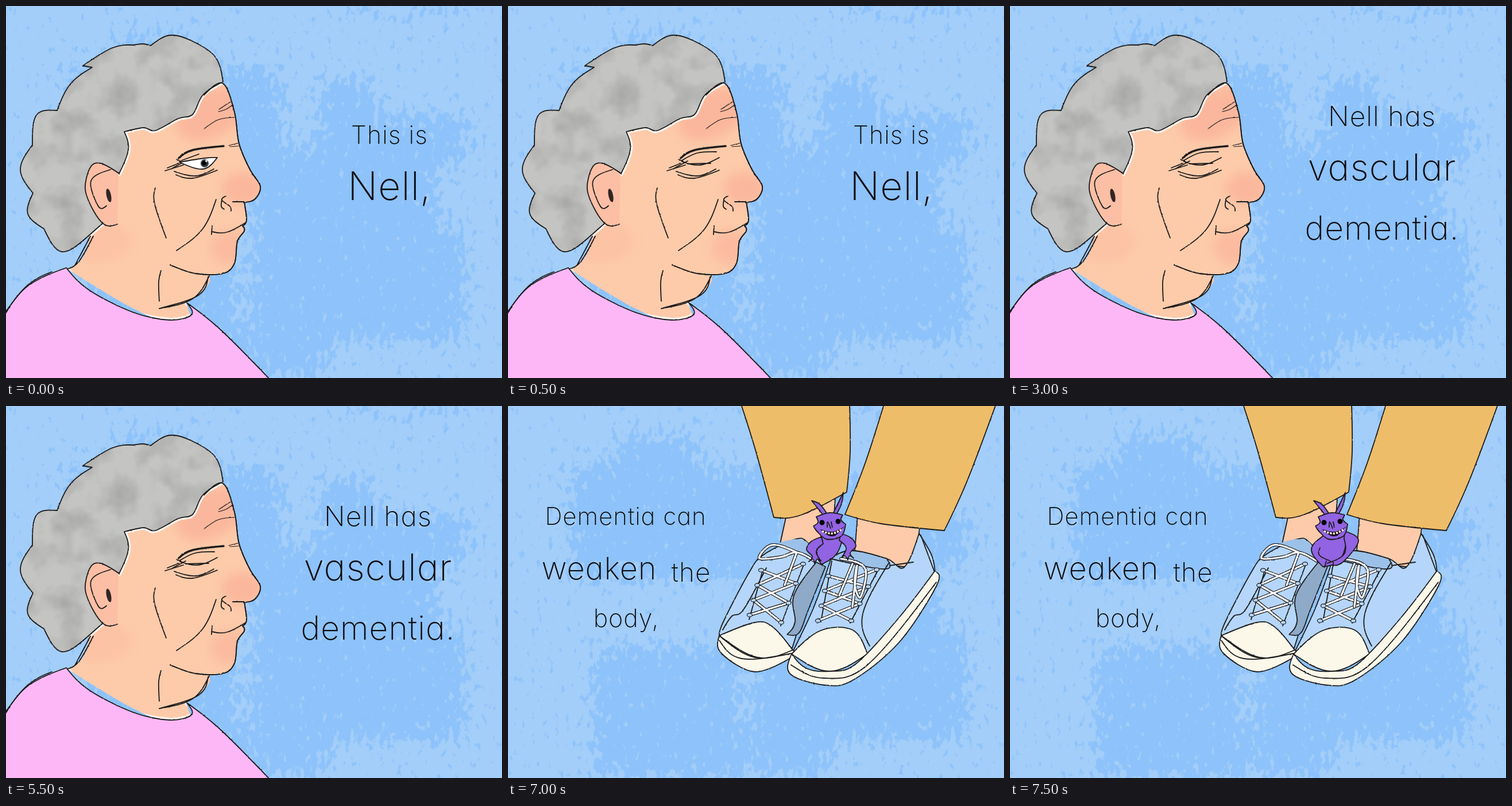
An HTML page that plays this animation: 864 by 648 pixels, repeating every 8000 ms.

```html
<!DOCTYPE html>
<html lang="en">
<head>
<meta charset="utf-8">
<title>Living with dementia</title>
<style>
  html, body { margin: 0; width: 100%; height: 100%; overflow: hidden; background: #a3cef9; }
  svg { display: block; width: 100vw; height: 100vh; }
  path { stroke-linecap: round; stroke-linejoin: round; }
  .ink { fill: none; stroke: #1c1a1b; stroke-width: 1.8; }
  .bold { stroke-width: 3.6; }
  .fine { stroke-width: 1.2; }
  .skin { fill: #fdcbaa; }
  .ear { fill: #fcbfa5; }
  .hair { fill: #c4c4c2; }
  .shirt { fill: #fdb7f6; }
  .cloth { fill: #eebd6a; }
  .cream { fill: #fbf8ea; }
  .denim { fill: #b5d6fa; }
  .lining { fill: #9bc1e9; }
  .shade { fill: #8eaac8; }
  .purple { fill: #9264e2; }
  .white { fill: #fff; }
  .blush { fill: #f9a48f; }
  .halo { fill: none; stroke: #fff7f0; stroke-width: 8; }
  .edge { fill: none; stroke: #1c1a1b; stroke-width: 5.6; }
  .lace { fill: none; stroke: #fff; stroke-width: 3.2; }
  .teeth { fill: none; stroke: #fff3da; stroke-width: 3.4; stroke-dasharray: 3.4 2; stroke-linecap: butt; }
  text { font-family: Inter, Lato, sans-serif; font-weight: 200; font-feature-settings: "cv11"; letter-spacing: 1px; text-anchor: middle; fill: #0c0d10; }
</style>
</head>
<body>
<svg viewBox="0 0 864 648">
  <defs>
    <filter id="grunge" filterUnits="userSpaceOnUse" x="0" y="0" width="864" height="648" color-interpolation-filters="sRGB">
      <feGaussianBlur in="SourceAlpha" stdDeviation="20" result="soft"/>
      <feTurbulence type="fractalNoise" baseFrequency=".1 .06" numOctaves="5" seed="8"/>
      <feColorMatrix values="0 0 0 0 0  0 0 0 0 0  0 0 0 0 0  1 0 0 0 0"/>
      <feComposite in2="soft" operator="arithmetic" k2="1.3" k3=".6" k4="-.45"/>
      <feComponentTransfer result="patch"><feFuncA type="linear" slope="7" intercept="-3"/></feComponentTransfer>
      <feFlood flood-color="#8dc2fa"/>
      <feComposite in2="patch" operator="in"/>
    </filter>
    <filter id="wash" color-interpolation-filters="sRGB">
      <feTurbulence type="fractalNoise" baseFrequency=".022" numOctaves="3" seed="4"/>
      <feColorMatrix values="0 0 0 0 .4  0 0 0 0 .4  0 0 0 0 .4  .6 0 0 0 -.24"/>
      <feComposite in2="SourceAlpha" operator="in" result="tint"/>
      <feMerge><feMergeNode in="SourceGraphic"/><feMergeNode in="tint"/></feMerge>
    </filter>
    <filter id="pencil" filterUnits="userSpaceOnUse" x="0" y="0" width="864" height="648">
      <feTurbulence type="fractalNoise" baseFrequency=".25" numOctaves="2"/>
      <feDisplacementMap in="SourceGraphic" scale="2" xChannelSelector="R" yChannelSelector="G"/>
    </filter>
    <filter id="blur" x="-60%" y="-60%" width="220%" height="220%"><feGaussianBlur stdDeviation="9"/></filter>

    <path id="head" data-p="200,205* 345,150* 390,300 378,440 354,469* 350,488 314,519* 323,542* 250,540 107,458* 140,425 150,330z"/>
    <path id="profile" data-p="345,155* 378,135 398,185 406,240 425,285 443,314 434,336 415,342* 419,373 412,383* 415,392 403,410 398,448 378,466 330,466 286,451*"/>
    <path id="hair" data-p="378,132* 364,88 322,60 285,51 252,69* 238,66 222,68* 185,73 134,104* 150,107* 112,136 89,182* 53,190 46,242* 25,285 47,326* 38,362 66,388* 97,428 143,401* 169,378* 165,300 197,292* 213,250 206,219* 240,212 260,217 300,196 325,189 343,155 378,132*z"/>
    <path id="shirt" data-p="105,456* 145,495 220,533 285,547 323,538 315,517* 375,565 464,655* -9,655* -9,550* 35,490 105,456*z"/>
    <clipPath id="skinClip"><use href="#head"/><use href="#profile"/></clipPath>

    <path id="laces"/>
    <path id="bows" data-p="503,255 460,242 438,265 475,263 503,255 534,270 / 503,255 482,312 / 580,266 622,283 614,333 604,312 607,280 / 600,275 577,330 / 608,278 600,350"/>
    <path id="arm" class="ink purple" data-p="546,228* 528,236 520,250 530,262 524,271* 531,267 534,274* 539,267 545,270* 537,253 549,240*z"/>
  </defs>

  <rect width="864" height="648" fill="#a3cef9"/>
  <path filter="url(#grunge)" d="M545 130H640V190H805V270H750V390H800V580H560V640H430V250H545ZM110 100H190V50H330V110H480V300H110ZM150 420H400V560H420V648H150ZM590 0H800V16H590Z"/>

  <g id="portrait">
    <g filter="url(#pencil)">
      <use href="#head" class="skin"/>
      <use href="#profile" class="ink skin"/>
    </g>
    <g clip-path="url(#skinClip)">
      <g class="blush" filter="url(#blur)">
        <ellipse cx="358" cy="188" rx="66" ry="40" opacity=".5" transform="rotate(-28 358 188)"/>
        <ellipse cx="412" cy="318" rx="36" ry="28" opacity=".5"/>
        <ellipse cx="388" cy="420" rx="32" ry="30" opacity=".4"/>
        <ellipse cx="162" cy="410" rx="55" ry="36" opacity=".2"/>
      </g>
      <use href="#hair" class="halo"/>
      <use href="#shirt" class="halo"/>
    </g>
    <use href="#hair" class="hair" filter="url(#wash)"/>
    <g filter="url(#pencil)">
      <use href="#hair" class="ink"/>
      <use href="#shirt" class="ink shirt"/>
      <use href="#profile" class="ink"/>
      <path class="ink ear" data-p="196,291* 165,274 147,281 138,318 151,354 172,381 194,380*"/>
      <path class="ink" data-p="182,285 148,305 161,349 175,348 / 415,341 395,341 / 152,401 127,445 107,458 / 147,401 120,452 / 354,470 325,510 267,527 / 352,472 335,504 270,526 / -3,536 38,486 80,463"/>
      <path class="ink" data-p="260,317 259,345 279,404 / 366,337 342,389 297,426 / 359,383 358,398 / 358,393 385,394 418,377 / 383,331 376,338 390,349 392,357 / 376,338 375,349 380,354 / 270,461 266,480 267,514"/>
      <path class="ink fine" data-p="370,184 383,180 395,172 / 371,180 391,167 / 345,214 370,198 398,194 / 388,243 404,239 / 390,245 405,244"/>
      <path class="ink bold" data-p="301,265 325,251 379,244"/>
      <path class="ink" data-p="277,287 309,277 / 281,282 301,274 / 297,267 309,273 / 289,283 313,270 / 293,288 330,296 362,284 / 296,294 325,300 368,286"/>
      <ellipse cx="179" cy="330" rx="4" ry="12" transform="rotate(-12 179 330)" fill="#302523"/>
    </g>
    <g id="eyeOpen">
      <path class="ink white" data-p="302,272* 346,265 368,264* 343,284 302,272*z"/>
      <circle cx="346" cy="274" r="7" fill="#343c42"/>
      <circle cx="345" cy="274" r="3.8"/>
      <circle cx="349" cy="270" r="1.8" class="white"/>
      <path class="ink" data-p="306,269 336,258"/>
    </g>
    <path id="eyeShut" class="ink" data-p="303,269 330,256 363,254 / 303,271 335,277 368,264 / 313,275 353,274"/>
    <g id="intro">
      <text x="668" y="240" font-size="43">This is</text>
      <text x="668" y="338" font-size="68">Nell,</text>
    </g>
    <g id="diagnosis">
      <text x="648" y="209" font-size="48">Nell has</text>
      <text x="648" y="304" font-size="64">vascular</text>
      <text x="648" y="407" font-size="57">dementia.</text>
    </g>
  </g>

  <g id="shoes">
    <g filter="url(#pencil)">
      <path class="ink skin" data-p="486,185* 473,245* 565,240* 570,160*z"/>
      <path class="ink skin" data-p="609,190* 604,253* 680,279 706,268 717,212*z"/>
      <path class="ink cloth" data-p="406,-3* 432,80 463,194* 510,190 590,150* 596,80 595,-3*"/>
      <path class="ink cloth" data-p="655,-3* 622,100 587,189* 650,205 760,217* 800,130 850,-3*"/>
      <path class="ink denim" data-p="368,400* 376,374 420,290 444,260 500,232 522,238 548,276* 520,345 494,425*z"/>
      <path class="lining" data-p="470,239* 500,232 522,238 533,264* 490,252z"/>
      <path class="ink shade" data-p="537,272* 498,330 500,376 486,398* 507,395 522,358 553,280*z"/>
      <path class="ink denim" data-p="494,432* 532,352 562,268* 598,252 660,266 690,281 716,222* 738,260 744,290* 680,373 626,432*z"/>
      <path class="ink lining" data-p="562,266* 598,252 660,266* 655,284 562,266*z"/>
      <path class="ink" data-p="444,285 420,372 / 516,274 475,383 / 450,282 410,355 390,366 374,390 / 564,270 545,376 / 645,285 596,378 / 663,274 618,362 630,418 / 665,278 706,272 / 719,225 744,292"/>
      <path class="ink cream" data-p="368,400* 372,431 430,463 494,438 496,425* 430,438 368,400*z"/>
      <path class="ink cream" data-p="368,400* 430,377 460,384 496,425* 435,438 368,400*z"/>
      <path class="ink cream" data-p="494,432* 545,391 600,390 626,432* 560,462 494,432*z"/>
      <path class="ink cream" data-p="743,288* 746,314 681,412 600,478 550,486 492,467 494,432* 520,457 560,462 605,450 680,370 743,288*z"/>
      <path class="ink" data-p="368,408 407,440 494,431 / 493,451 550,474 625,452 746,307"/>
      <use href="#laces" class="edge"/><use href="#laces" class="lace"/>
      <use href="#bows" class="edge"/><use href="#bows" class="lace"/>
      <g id="eyelets"></g>
    </g>
    <g id="armsApart" filter="url(#pencil)">
      <path class="ink purple" data-p="546,226* 538,256 546,276* 572,258 584,226*z"/>
      <use href="#arm"/>
      <use href="#arm" transform="translate(1126 -6) scale(-1 1)"/>
    </g>
    <g id="armsJoined" filter="url(#pencil)">
      <path class="ink purple" data-p="546,226* 525,250 545,280* 575,268 588,226*z"/>
      <path class="ink purple" data-p="583,218* 607,235 582,270 563,278* 562,271 553,274* 582,258 582,231*z"/>
      <path class="ink" data-p="540,247 539,260 558,270 / 548,281 551,270"/>
    </g>
    <g filter="url(#pencil)">
      <path class="ink purple" data-p="549,190* 529,165* 543,171 556,188*z"/>
      <path class="ink purple" data-p="566,188* 584,151* 581,170 573,187*z"/>
      <path class="ink purple" data-p="537,193* 560,186 583,190* 580,198 588,206* 580,227 555,232 538,218 532,209* 540,203 537,193*z"/>
      <path fill="#1b1020" data-p="543,214* 565,219 586,210* 565,227 543,214*z"/>
      <path class="teeth" data-p="547,218 565,222 583,214"/>
      <path class="ink" data-p="556,211 557,202 562,213 / 565,211 563,202"/>
      <circle cx="547" cy="203" r="4.5"/><circle cx="575" cy="201" r="4.5"/>
    </g>
    <text x="205" y="207" font-size="42">Dementia can</text>
    <text x="159" y="302" font-size="54">weaken</text>
    <text x="319" y="306" font-size="46">the</text>
    <text x="206" y="385" font-size="43">body,</text>
  </g>
</svg>
<script>
  const $ = id => document.getElementById(id);
  const mix = (a, b, t) => a.map((v, k) => v + (b[k] - v) * t);

  // Smooth stroke through "x,y" points; "*" marks a sharp corner, "z" closes.
  function curve(text) {
    const pts = text.replace('z', '').split(' ').map(s => s.split(',').map(parseFloat));
    const sharp = text.split(' ').map((s, i) => s.includes('*') || i === 0 || i === pts.length - 1);
    const handle = (i, side) => pts[i].map((v, k) => v + side * (pts[i + 1][k] - pts[i - 1][k]) / 6);
    let d = 'M' + pts[0];
    for (let i = 1; i < pts.length; i++) {
      const a = pts[i - 1], b = pts[i];
      let out = sharp[i - 1] ? a : handle(i - 1, 1);
      let back = sharp[i] ? b : handle(i, -1);
      // A corner leans toward the opposite handle, which keeps bumps round.
      if (sharp[i - 1]) out = mix(a, back, .5);
      else if (sharp[i]) back = mix(b, out, .5);
      d += `C${out} ${back} ${b}`;
    }
    return text.endsWith('z') ? d + 'Z' : d;
  }

  for (const path of document.querySelectorAll('[data-p]'))
    path.setAttribute('d', path.dataset.p.split(' / ').map(curve).join(''));

  // Crossed laces between two evenly spaced rows of eyelets.
  function lace(leftTop, leftEnd, rightTop, rightEnd, rows = 4) {
    let d = '', holes = '';
    for (let i = 0; i < rows; i++) {
      const row = n => [mix(leftTop, leftEnd, n / (rows - 1)), mix(rightTop, rightEnd, n / (rows - 1))];
      const [l, r] = row(i);
      for (const [x, y] of [l, r])
        holes += `<ellipse class="ink fine denim" cx="${x}" cy="${y}" rx="4.5" ry="3.2"/>`;
      if (i < rows - 1) {
        const [l2, r2] = row(i + 1);
        d += `M${l}L${r2}M${r}L${l2}`;
      }
    }
    $('laces').setAttribute('d', ($('laces').getAttribute('d') || '') + d);
    $('eyelets').innerHTML += holes;
  }
  lace([441, 286], [421, 364], [514, 275], [476, 377]);
  lace([558, 296], [540, 374], [642, 285], [598, 374]);

  const show = (id, on) => { $(id).style.display = on ? '' : 'none'; };

  function draw() {
    const t = performance.now() % 8000;
    const shut = t % 2500 >= 500 && t % 2500 < 1000;
    show('portrait', t < 7000);
    show('intro', t < 3000);
    show('diagnosis', t >= 3000);
    show('eyeOpen', !shut);
    show('eyeShut', shut);
    show('shoes', t >= 7000);
    show('armsApart', t < 7500);
    show('armsJoined', t >= 7500);
    requestAnimationFrame(draw);
  }
  draw();
</script>
</body>
</html>
```
